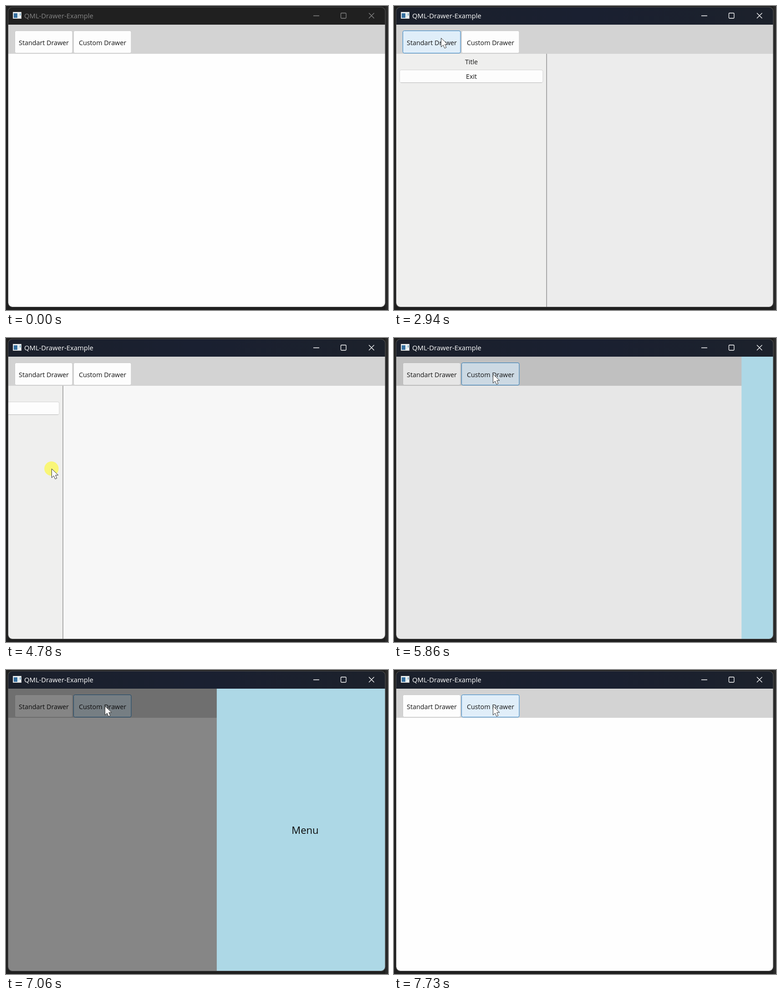
Recreate the animation shown at these times as an HTML page. Size 839 by 668 pixels, loop 8000 ms.

```html
<!DOCTYPE html>
<html lang="en">
<head>
<meta charset="utf-8">
<title>QML-Drawer-Example</title>
<style>
  html, body { margin: 0; width: 100%; height: 100%; overflow: hidden; background: #1f1f1f; }
  svg { display: block; width: 839px; height: 668px; }
  text { font: 14.3px "Open Sans", "Noto Sans", sans-serif; fill: #141414; text-anchor: middle; }
  #caption { font-size: 14.8px; text-anchor: start; }
  #menuLabel { font-size: 22px; fill: #0a0a0a; }
  .button { fill: #fdfdfd; stroke: #c9c9c9; }
  .button.hover { fill: #e0eef9; stroke: #2a80c4; }
  .button.pressed { fill: #cce4f7; stroke: #22689f; }
</style>
</head>
<body>
<svg viewBox="0 0 839 668">
  <defs>
    <clipPath id="windowClip"><rect x="5" y="3" width="828" height="658.5" rx="9"/></clipPath>
    <clipPath id="bodyClip"><rect x="5" y="105" width="828" height="557"/></clipPath>
    <linearGradient id="activeBar">
      <stop offset="0" stop-color="#1b202b"/>
      <stop offset=".5" stop-color="#1a2031"/>
      <stop offset="1" stop-color="#1c212b"/>
    </linearGradient>
  </defs>
  <rect width="839" height="668" fill="#1f1f1f"/>
  <rect x="833" width="6" height="668" fill="#292929"/>

  <g clip-path="url(#windowClip)">
    <rect id="titleBar" x="4" y="2" width="830" height="39"/>
    <rect x="15.5" y="13.5" width="18" height="14" fill="#f4f6f7" stroke="#c4c9cc"/>
    <rect x="17" y="16" width="8" height="10" fill="#346f9f"/>
    <rect x="26" y="16" width="3" height="10" fill="#dbe7e9"/>
    <rect x="30.5" y="16" width="1.5" height="5" fill="#4386a8"/>
    <text id="caption" x="40" y="27">QML-Drawer-Example</text>
    <path id="controls" d="M675 21.5h13M797 15.5l11.5 11.5M808.5 15.5l-11.5 11.5M737 15.5h8.5q1.5 0 1.5 1.5v8.5q0 1.5-1.5 1.5h-8.5q-1.5 0-1.5-1.5v-8.5q0-1.5 1.5-1.5z" fill="none" stroke-width="1.3"/>

    <rect x="5" y="41" width="828" height="621" fill="#fefefe"/>
    <rect x="5" y="41" width="828" height="64" fill="#d3d3d3"/>
    <rect id="standardButton" x="19.5" y="54.5" width="126.5" height="49" rx="3"/>
    <text x="83" y="85.5">Standart Drawer</text>
    <rect id="customButton" x="148.5" y="54.5" width="126.5" height="49" rx="3"/>
    <text x="212" y="85.5">Custom Drawer</text>

    <g clip-path="url(#bodyClip)">
      <rect id="lightDim" x="5" y="105" width="828" height="557"/>
      <g id="standardDrawer">
        <rect x="5" y="105" width="330" height="557" fill="#efefee"/>
        <path d="M335.2 105v557" stroke="#8c8c8c" stroke-width="1.4"/>
        <text x="170" y="128">Title</text>
        <rect x="12.5" y="140.5" width="314.5" height="28" rx="3" fill="#fdfdfd" stroke="#d2d2d2"/>
        <path d="M15 168.5h309.5" stroke="#b6b6b6"/>
        <text x="170" y="160">Exit</text>
      </g>
    </g>

    <rect id="darkDim" x="5" y="41" width="828" height="621"/>
    <g id="customDrawer">
      <rect x="832" y="41" width="389" height="621" fill="#add8e6"/>
      <text id="menuLabel" x="1026" y="360">Menu</text>
    </g>
  </g>
  <rect x="4.5" y="2.5" width="828.5" height="659" rx="9.5" fill="none" stroke="#4c4c4c" stroke-width="1.2"/>

  <g id="pointer">
    <circle id="clickSpot" r="15.7" fill="#fffa28" fill-opacity=".6"/>
    <path d="M.5 .5v19.5l4.6-4.3 3.1 7.2 3.6-1.6-3-7h6z" fill="#fff" stroke="#303030"/>
  </g>
</svg>
<script>
const LOOP = 8000;
const STANDARD_WIDTH = 331, CUSTOM_WIDTH = 388;
const GRAB_X = 310, DRAG_START = 3700, DRAG_END = 4960;

// [time, x, y]
const pointerPath = [
  [330, 330, 664], [1000, 103, 70], [2950, 103, 70], [3290, 140, 102], [3420, 238, 207],
  [3650, 310, 296], [3750, 310, 296], [3910, 275, 298], [4780, 100, 287],
  [DRAG_END, 75, 286], [5150, 75, 286], [5620, 217, 79], [LOOP, 217, 79]
];
const presses = [[1050, 1130], [1990, 2085], [2420, 2485], [DRAG_START, DRAG_END], [5700, 5795], [6925, 7035]];

const byId = id => document.getElementById(id);
const set = (id, name, value) => byId(id).setAttribute(name, value);
const progress = (t, start, end) => Math.min(1, Math.max(0, (t - start) / (end - start)));
const outQuad = u => 1 - (1 - u) ** 2;
const inOutQuad = u => u < .5 ? 2 * u * u : 1 - 2 * (1 - u) ** 2;
const shift = (id, x, y = 0) => set(id, "transform", `translate(${x} ${y})`);

function pointerAt(t) {
  const next = Math.max(1, pointerPath.findIndex(p => p[0] > t));
  const [a, b] = [pointerPath[next - 1], pointerPath[next]];
  const u = progress(t, a[0], b[0]);
  return [a[1] + (b[1] - a[1]) * u, a[2] + (b[2] - a[2]) * u];
}

function standardPosition(t, pointerX) {
  const slide = (start, end) => inOutQuad(progress(t, start, end));
  if (t < DRAG_START) return slide(1130, 1405) - slide(2085, 2285) + slide(2485, 2750);
  const dragged = 1 + Math.min(0, pointerX - GRAB_X) / STANDARD_WIDTH;
  const released = 1 + (75 - GRAB_X) / STANDARD_WIDTH;
  return t < DRAG_END ? dragged : released * (1 - outQuad(progress(t, DRAG_END, 5130)));
}

function customPosition(t) {
  return outQuad(progress(t, 5796, 6496)) - outQuad(progress(t, 7044, 7734));
}

function styleButton(id, left, right, x, y, visible, pressed) {
  const hover = visible && x > left && x < right && y > 54 && y < 104;
  set(id, "class", "button" + (hover ? pressed ? " pressed" : " hover" : ""));
}

function render(t) {
  const [x, y] = pointerAt(t);
  const visible = t >= 330;
  const pressed = presses.some(([start, end]) => t >= start && t < end);
  const active = t >= presses[0][0];
  const standard = standardPosition(t, x);
  const custom = customPosition(t);

  set("titleBar", "fill", active ? "url(#activeBar)" : "#202020");
  byId("caption").style.fill = active ? "#fff" : "#858585";
  set("controls", "stroke", active ? "#fff" : "#858585");
  styleButton("standardButton", 19, 146, x, y, visible, pressed);
  styleButton("customButton", 148, 275, x, y, visible, pressed);

  shift("standardDrawer", (standard - 1) * STANDARD_WIDTH);
  set("standardDrawer", "visibility", standard > .001 ? "visible" : "hidden");
  set("lightDim", "fill-opacity", .07 * standard);
  shift("customDrawer", -custom * CUSTOM_WIDTH);
  set("customDrawer", "visibility", custom > .001 ? "visible" : "hidden");
  set("darkDim", "fill-opacity", .5 * custom);

  shift("pointer", x, y);
  set("pointer", "display", visible ? "inline" : "none");
  set("clickSpot", "display", pressed ? "inline" : "none");
}

const startTime = performance.now();
function tick() {
  render((performance.now() - startTime) % LOOP);
  requestAnimationFrame(tick);
}
render(0);
requestAnimationFrame(tick);
</script>
</body>
</html>
```
